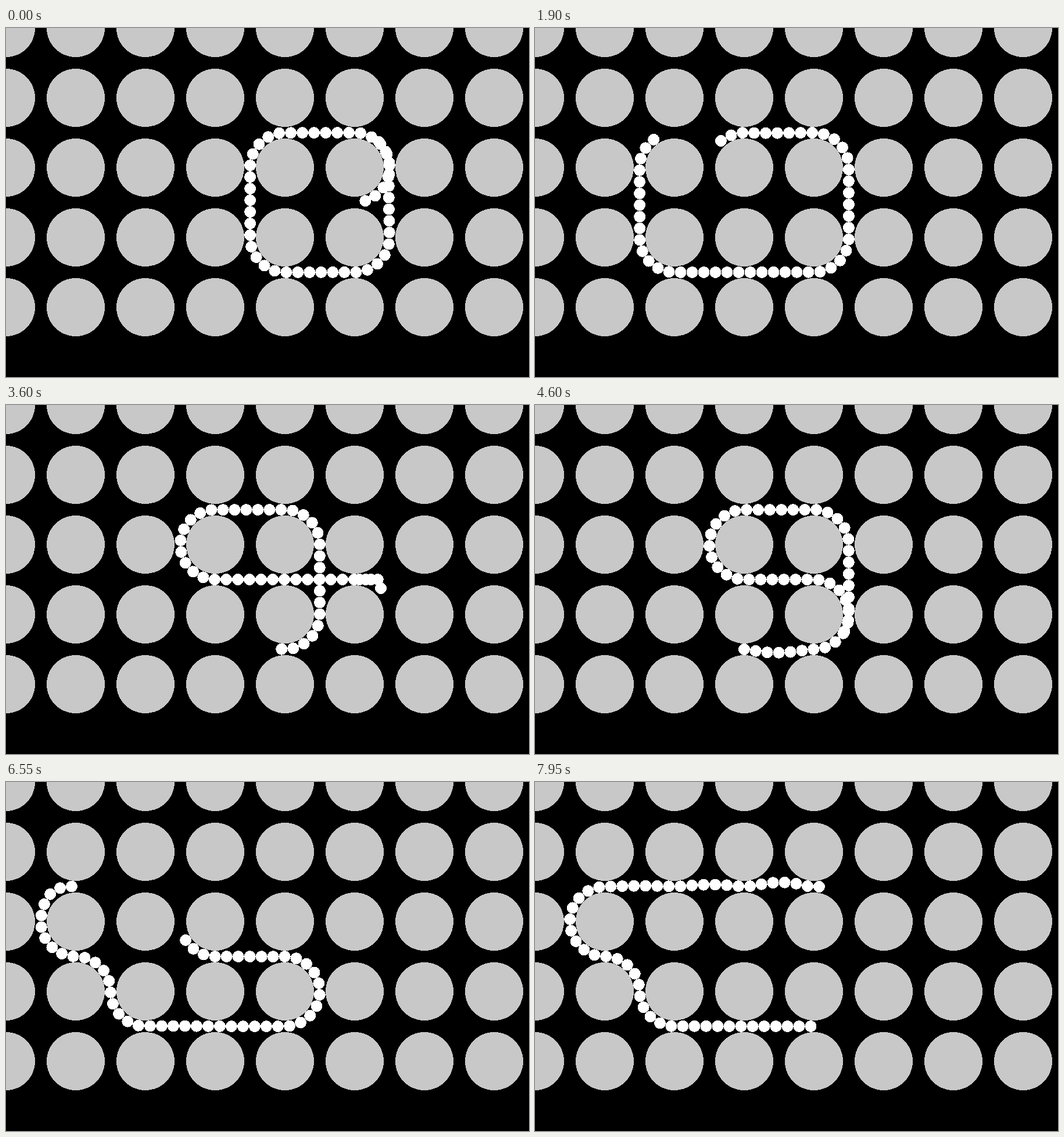
Animation, 900 px wide and 600 px high, one loop 8 s. Source, as an HTML page:

```html
<!DOCTYPE html>
<html>
<head>
<meta charset="utf-8">
<style>
  html, body { margin: 0; width: 100%; height: 100%; overflow: hidden; background: #000; }
  svg { display: block; }
  circle { shape-rendering: crispEdges; }
</style>
</head>
<body>
<svg id="stage" width="900" height="600"></svg>
<script>
const FRAME = 50, LOOP = 8000, SUBSTEPS = 20;
const GRID = 120, PEG = 50, BEAD = 10, LINK = 20, COUNT = 50;
const STEP = { L: [-GRID, 0], R: [GRID, 0], U: [0, -GRID], D: [0, GRID] };

// The leading bead goes from gap to gap between the pegs, then to a resting
// point. The leg before time 0 winds the chain around four pegs.
const startTime = -2000;
const legs = [
  { until: 0, route: 'ULLDDRRU', to: [642, 196] },
  { until: 350, route: 'LLLL', to: [106, 180] },
  { until: 850, route: 'RDDRR', to: [543, 380] },
  { until: 1250, route: 'UU', to: [540, 150] },
  { until: 1900, route: 'L', to: [320, 194] },
  { until: 2800, route: 'DRRR', to: [719, 300] },
  { until: 3250, route: '', to: [548, 300] },
  { until: 3600, route: 'R', to: [645, 315] },
  { until: 4450, route: 'LD', to: [420, 431] },
  { until: 4750, route: '', to: [300, 409] },
  { until: 5100, route: '', to: [180, 402] },
  { until: 5400, route: '', to: [175, 382] },
  { until: 6550, route: 'ULU', to: [113, 179] },
  { until: 6750, route: '', to: [180, 154] },
  { until: 7200, route: '', to: [300, 155] },
  { until: 7650, route: '', to: [420, 165] },
  { until: 7950, route: '', to: [489, 180] }
];

const chain = Array.from({ length: COUNT }, () => ({ x: 618, y: 296 }));
const nearestPeg = v => Math.round(v / GRID) * GRID;
const nearestGap = v => nearestPeg(v - GRID / 2) + GRID / 2;

function pushOffPegs(bead) {
  for (let pass = 0; pass < 2; pass++) {
    const cx = nearestPeg(bead.x), cy = nearestPeg(bead.y);
    const dx = bead.x - cx, dy = bead.y - cy, d = Math.hypot(dx, dy);
    if (d > 0 && d < PEG + BEAD) {
      bead.x = cx + dx / d * (PEG + BEAD);
      bead.y = cy + dy / d * (PEG + BEAD);
    }
  }
}

function pullTowards(bead, leader) {
  const dx = bead.x - leader.x, dy = bead.y - leader.y, d = Math.hypot(dx, dy);
  if (d > LINK) {
    bead.x = leader.x + dx / d * LINK;
    bead.y = leader.y + dy / d * LINK;
  }
}

function moveHead([x, y]) {
  Object.assign(chain[0], { x, y });
  pushOffPegs(chain[0]);
  for (let i = 1; i < COUNT; i++) {
    for (let pass = 0; pass < 2; pass++) {
      pullTowards(chain[i], chain[i - 1]);
      pushOffPegs(chain[i]);
    }
  }
}

function pathOf({ route, to }) {
  const { x, y } = chain[0];
  const points = [[x, y]];
  let gap = [nearestGap(x), nearestGap(y)];
  for (const letter of route) {
    gap = gap.map((v, axis) => v + STEP[letter][axis]);
    points.push(gap);
  }
  return [...points, to];
}

// Returns a function giving the point at a share of the path's length.
function tracer(points) {
  const sizes = points.slice(1).map(([x, y], i) => Math.hypot(x - points[i][0], y - points[i][1]));
  const total = sizes.reduce((sum, size) => sum + size, 0);
  return share => {
    let rest = share * total, i = 0;
    while (i < sizes.length - 1 && rest > sizes[i]) rest -= sizes[i++];
    const k = Math.min(1, rest / sizes[i]);
    return points[i].map((v, axis) => v + (points[i + 1][axis] - v) * k);
  };
}

function buildPoses() {
  const poses = [];
  let time = startTime;
  for (const leg of legs) {
    const at = tracer(pathOf(leg));
    const steps = (leg.until - time) / FRAME * SUBSTEPS;
    for (let s = 1; s <= steps; s++) {
      moveHead(at(s / steps));
      if (s % SUBSTEPS) continue;
      time += FRAME;
      if (time >= 0) poses.push(chain.map(bead => ({ ...bead })));
    }
  }
  return poses;
}

function addDisc(x, y, r, fill) {
  const disc = document.createElementNS('http://www.w3.org/2000/svg', 'circle');
  const attributes = { cx: x, cy: y, r, fill };
  for (const name in attributes) disc.setAttribute(name, attributes[name]);
  return document.getElementById('stage').appendChild(disc);
}

for (let x = 0; x <= 840; x += GRID)
  for (let y = 0; y <= 480; y += GRID) addDisc(x, y, PEG, '#c8c8c8');
const beads = chain.map(({ x, y }) => addDisc(x, y, BEAD, '#fff'));

const poses = buildPoses();
const start = performance.now();

function tick() {
  const time = (performance.now() - start) % LOOP;
  poses[Math.floor(time / FRAME)].forEach(({ x, y }, i) => {
    beads[i].setAttribute('cx', x);
    beads[i].setAttribute('cy', y);
  });
  requestAnimationFrame(tick);
}
tick();
</script>
</body>
</html>
```
